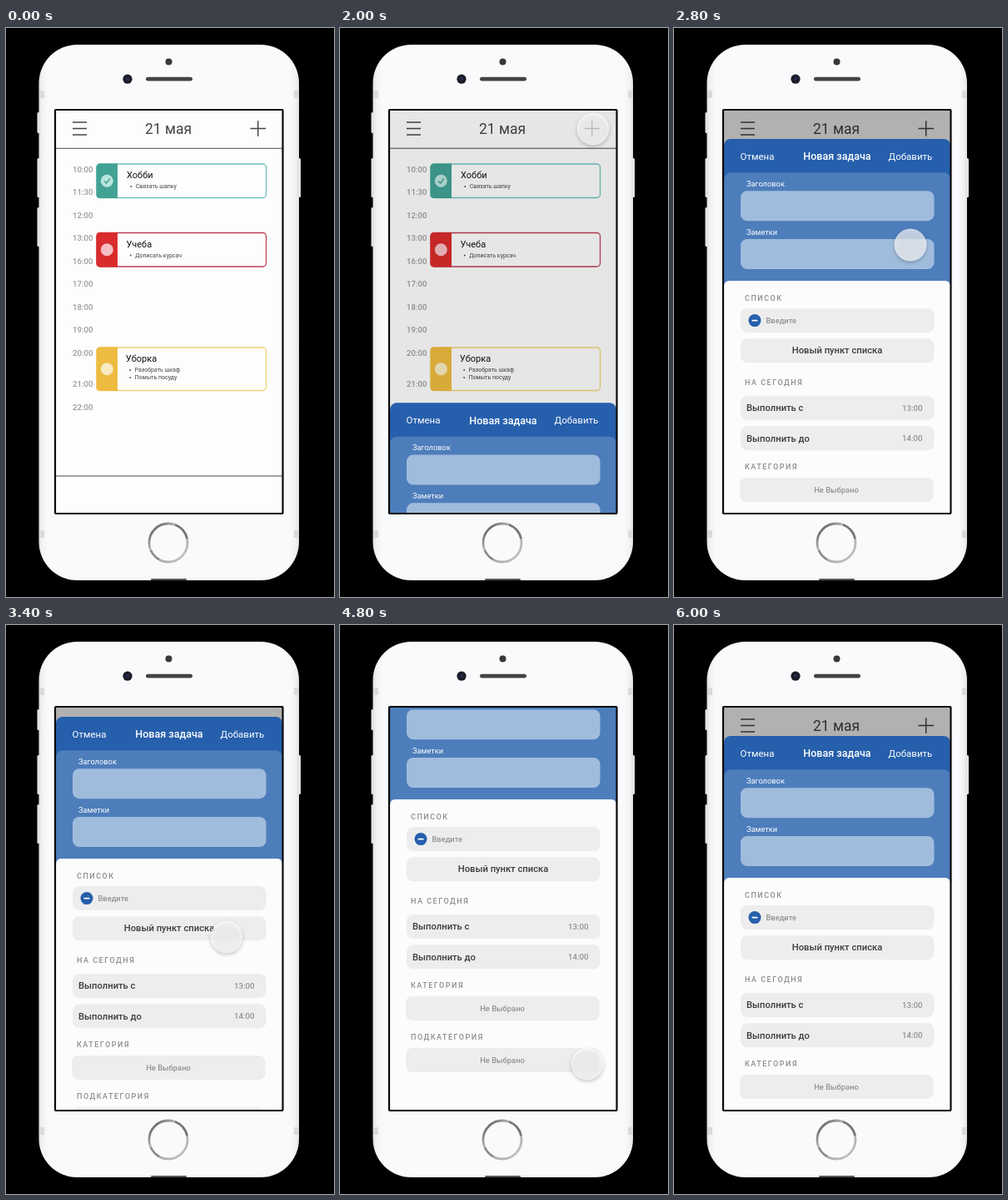
These frames come from a looping animation (394x682 px, 6400 ms). An HTML page:

```html
<!DOCTYPE html>
<html lang="ru">
<head>
<meta charset="utf-8">
<style>
  html, body { margin: 0; width: 100%; height: 100%; overflow: hidden; background: #000; }
  svg { display: block; font-family: Roboto, sans-serif; }
  #touch { filter: drop-shadow(0 2px 2px rgba(0, 0, 0, .3)); }
</style>
</head>
<body>
<svg width="394" height="682" viewBox="0 0 394 682">
  <defs>
    <clipPath id="screen"><rect x="60" y="98" width="272" height="484"/></clipPath>
    <linearGradient id="body">
      <stop offset="0" stop-color="#dedfe1"/><stop offset=".012" stop-color="#f1f2f4"/>
      <stop offset=".035" stop-color="#f9fafc"/><stop offset=".965" stop-color="#f9fafc"/>
      <stop offset=".988" stop-color="#f1f2f4"/><stop offset="1" stop-color="#dedfe1"/>
    </linearGradient>
    <linearGradient id="ring" x1="0" y1="0" x2="1" y2="1">
      <stop offset="0" stop-color="#444"/><stop offset=".45" stop-color="#d8d8da"/>
      <stop offset=".6" stop-color="#aaa"/><stop offset="1" stop-color="#c8c8ca"/>
    </linearGradient>
  </defs>
  <g id="phone"></g>
  <g clip-path="url(#screen)">
    <g id="day"></g>
    <rect id="shade" x="60" y="98" width="272" height="484"/>
    <g id="sheet"></g>
  </g>
  <rect x="59" y="98" width="273.5" height="484" rx="1" fill="none" stroke="#0a0a0a" stroke-width="2.2"/>
  <circle id="touch" r="19" fill="#fff" fill-opacity=".67" stroke="#fff" stroke-opacity=".5"/>
  <path id="arrow" d="M0 0V14L3.3 11L5.5 16L7.8 15L5.7 10.2H10Z" fill="#000" stroke="#fff" stroke-width=".9"/>
</svg>
<script>
const $ = id => document.getElementById(id);
const rect = (x, y, w, h, fill, r = 0, extra = '') =>
  `<rect x="${x}" y="${y}" width="${w}" height="${h}" rx="${r}" fill="${fill}" ${extra}/>`;
const dot = (x, y, r, fill) => `<circle cx="${x}" cy="${y}" r="${r}" fill="${fill}"/>`;
const path = (d, color, width) =>
  `<path d="${d}" fill="none" stroke="${color}" stroke-width="${width}"/>`;
// y is the middle of the capital letters
const text = (s, x, y, size, fill, weight = 400, extra = '') =>
  `<text x="${x}" y="${y + size * .355}" font-size="${size}" fill="${fill}" font-weight="${weight}" ${extra}>${s}</text>`;
const MIDDLE = 'text-anchor="middle"';

function phone() {
  const buttons = [[37.5, 101, 25], [37.5, 156, 47], [37.5, 215, 47], [350.5, 156, 47]]
    .map(([x, y, h]) => rect(x, y, 3.5, h, '#e3e4e6', 1.5)).join('');
  const bands = [[40, 75], [346, 75], [40, 602], [346, 602]]
    .map(([x, y]) => rect(x, y, 6, 9, '#d9dadc')).join('');
  return buttons + rect(39.5, 20, 312.5, 642, 'url(#body)', 46) + bands +
    rect(174, 660, 43, 2, '#55565a', 1) +
    dot(195.5, 40.5, 4, '#38383a') + dot(146, 61.2, 5.6, '#1b1b26') + dot(146, 61.2, 2.4, '#25264a') +
    rect(168, 58.8, 56, 4.8, '#434345', 2.4) +
    `<circle cx="195" cy="617" r="23" fill="none" stroke="url(#ring)" stroke-width="2.8"/>` +
    path('M203 595.4A23 23 0 0 1 217.5 612', '#747476', 2.6) +
    path('M174 626A23 23 0 0 0 184 637', '#8a8a8c', 2.4);
}

function card(y, h, color, border, knob, x, title, notes) {
  const mid = y + h / 2;
  return rect(109, y, 203.5, h, '#fdfdfd', 4, `stroke="${border}" stroke-width="1.3"`) +
    `<path d="M134 ${y - .6}H113Q108.5 ${y - .6} 108.5 ${y + 4}V${y + h - 4}Q108.5 ${y + h + .6} 113 ${y + h + .6}H134Z" fill="${color}"/>` +
    dot(121.3, mid, 7.5, knob) + text(title, x, y + 13.3, 11, '#111') +
    notes.map((s, i) => dot(x + 5.3, y + 27 + i * 9, .9, '#444') +
      text(s, x + 10.7, y + 27 + i * 9, 7, '#444')).join('');
}

function day() {
  const rows = ['10:00', '11:30', '12:00', '13:00', '16:00', '17:00', '18:00', '19:00', '20:00', '21:00', '22:00'];
  return rect(60, 98, 272, 484, '#fdfdfd') +
    path('M80 113H97M80 120.5H97M80 128H97', '#444', 1.3) +
    path('M293.5 120.5H312M302.7 111.3V129.7', '#444', 1.5) +
    text('21 мая', 195, 120.5, 17.5, '#444', 400, MIDDLE) +
    path('M60 144.3H332M60 537H332', '#4a4a4a', 1.1) +
    rows.map((s, i) => text(s, 80, 169.5 + i * 27.5 + (i > 8 ? 10 : 0), 9.6, '#999', 500)).join('') +
    card(163, 40.5, '#42a294', '#6fc1b9', '#b9e4de', 145, 'Хобби', ['Связать шапку']) +
    path('M118 183.5L120.6 186L124.8 180.4', '#42a294', 1.5) +
    card(245.5, 40.5, '#d92b2b', '#bd3e58', '#f6bdc4', 144.5, 'Учеба', ['Дописать курсач']) +
    card(383, 51.5, '#edbb40', '#f0d273', '#f8ebc0', 143.8, 'Уборка', ['Разобрать шкаф', 'Помыть посуду']);
}

function sheet() {
  const field = (label, y) => text(label, 87, y, 9.3, '#fff') + rect(80, y + 8.7, 232.5, 36, '#a0bcdd', 8);
  const heading = (s, y) => text(s, 85, y, 9, '#8c8c8c', 500, 'letter-spacing="1.5"');
  const box = (y, x = 80) => rect(x, y, 232.5, 29, '#ededed', 8);
  const time = (label, value, y) => box(y) + text(label, 87, y + 14.3, 11.2, '#3c3c3c', 500) +
    text(value, 274, y + 14.3, 9.7, '#929292', 500);
  const choice = (label, y) => heading(label, y) +
    box(y + 13, 79) + text('Не Выбрано', 195, y + 27.3, 9.4, '#929292', 500, MIDDLE);
  return rect(60, 0, 272, 700, '#265fac', 8) +
    text('Отмена', 79.5, 21, 11.5, '#fff') +
    text('Новая задача', 196, 21, 12.5, '#fff', 500, MIDDLE) +
    text('Добавить', 257.5, 21, 11.5, '#fff') +
    rect(60, 40.3, 272, 660, '#4d7dbb', 8) +
    field('Заголовок', 53.5) + field('Заметки', 111.3) +
    rect(60, 170, 272, 560, '#fcfcfc', 6) +
    heading('СПИСОК', 190.5) + box(203) +
    dot(97, 217.6, 7.5, '#265fac') + rect(93.5, 216.7, 7, 1.8, '#fff', .6) +
    text('Введите', 110.5, 217.8, 9.3, '#929292', 500) +
    box(239.3) + text('Новый пункт списка', 196, 253.5, 11.2, '#3c3c3c', 500, MIDDLE) +
    heading('НА СЕГОДНЯ', 292) +
    time('Выполнить с', '13:00', 308) + time('Выполнить до', '14:00', 344.3) +
    choice('КАТЕГОРИЯ', 393) + choice('ПОДКАТЕГОРИЯ', 455);
}

const arrowTrack = [[900, 383, 193], [1000, 364, 158], [1100, 342, 131], [1200, 324, 121], [1300, 312, 120],
  [1500, 303, 120], [5600, 303, 120], [5700, 373, 286]];
const touchTrack = [[2600, 304, 121], [2700, 298, 165], [2800, 284, 260], [2900, 270, 345], [3000, 265, 374],
  [3900, 265, 374], [4100, 279, 452], [4300, 297, 526], [5200, 297, 526], [5400, 297, 503], [5600, 324, 400]];
const scrollTrack = [[3300, 133], [3400, 110], [3500, 57], [3600, 35], [4700, 35]];

function follow(track, t) {
  const i = track.findIndex(p => p[0] >= t);
  if (i < 0) return track[track.length - 1].slice(1);
  if (i === 0) return track[0].slice(1);
  const [a, b] = [track[i - 1], track[i]];
  const k = (t - a[0]) / (b[0] - a[0]);
  return a.slice(1).map((v, j) => v + (b[j + 1] - v) * k);
}
const progress = (t, from, to) => Math.min(1, Math.max(0, (t - from) / (to - from)));
const ease = (p, n) => p < .5 ? (2 * p) ** n / 2 : 1 - (2 - 2 * p) ** n / 2;
const place = (id, x, y, shown) => {
  $(id).setAttribute('transform', `translate(${x} ${y})`);
  $(id).setAttribute('visibility', shown ? 'visible' : 'hidden');
};

function draw(now) {
  const t = Math.floor(now % 6400 / 100) * 100;
  const open = ease(progress(t, 1794, 2285), 3);
  const top = open < 1 ? 582 - 449 * open
    : follow(scrollTrack, t)[0] + 98 * ease(progress(t, 4700, 5400), 2);
  $('shade').setAttribute('opacity', .3 * open);
  place('sheet', 0, top, open > 0);
  place('touch', ...follow(touchTrack, t), t >= 1800 && t < 5700);
  place('arrow', ...follow(arrowTrack, t), t >= 900 && t < 1600 || t === 5700);
  requestAnimationFrame(draw);
}

$('phone').innerHTML = phone();
$('day').innerHTML = day();
$('sheet').innerHTML = sheet();
draw(performance.now());
</script>
</body>
</html>
```
